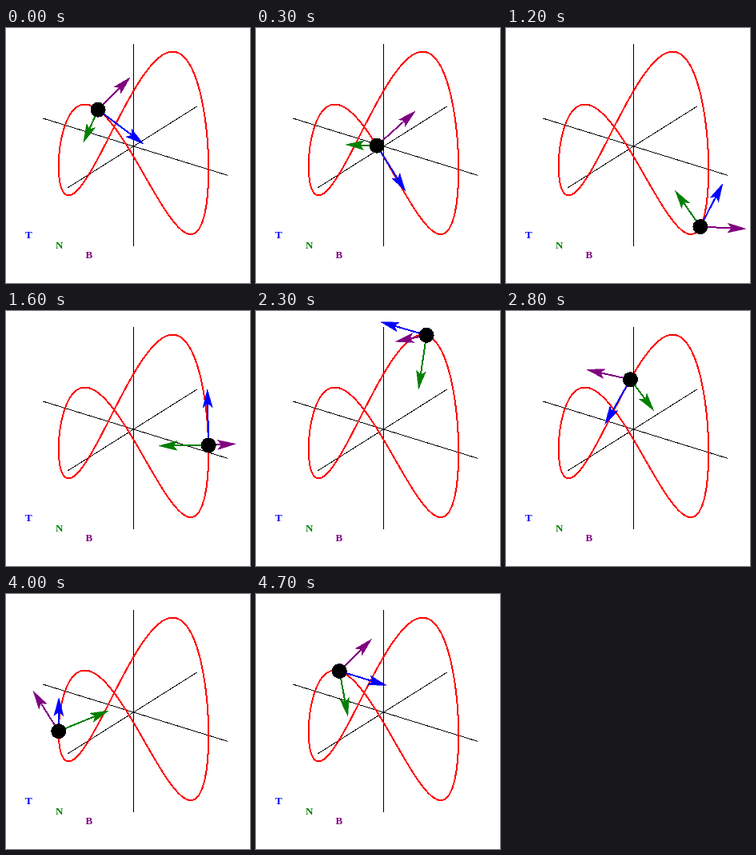
Recreate the animation shown at these times as an HTML page. Size 305 by 319 pixels, loop 4.8 s.

```html
<!DOCTYPE html>
<html lang="en">
<head>
<meta charset="utf-8">
<title>Moving frame on a space curve</title>
<style>
  html, body { margin: 0; width: 100%; height: 100%; overflow: hidden; background: #fff; }
  svg { display: block; width: 305px; height: 319px; }
  path, circle { shape-rendering: crispEdges; }
  text { font: bold 13px "Liberation Serif", "Times New Roman", serif; }
</style>
</head>
<body>
<svg viewBox="0 0 305 319">
  <path id="axes" stroke="#000" fill="none"/>
  <path id="curve" stroke="#f00" stroke-width="2" fill="none"/>
  <g id="arrows"></g>
  <circle id="ball" r="9.5"/>
  <text x="24" y="263" fill="#00f">T</text>
  <text x="62" y="275.5" fill="#008000">N</text>
  <text x="99.5" y="288" fill="#800080">B</text>
</svg>
<script>
const STEPS = 48, STEP_MS = 100, SCALE = 94, CAMERA = 52, ARROW = 0.75;
const CENTER = [159.5, 148];
const rad = Math.PI / 180;
const ca = Math.cos(35 * rad), sa = Math.sin(35 * rad);
const ce = Math.cos(26.2 * rad), se = Math.sin(26.2 * rad);
const el = id => document.getElementById(id);

const unit = v => v.map(c => c / Math.hypot(...v));
const cross = (a, b) => [
  a[1] * b[2] - a[2] * b[1],
  a[2] * b[0] - a[0] * b[2],
  a[0] * b[1] - a[1] * b[0]
];

// Mild perspective, seen from above the xy plane
function project([x, y, z]) {
  const side = sa * x - ca * y;
  const depth = side * ce + z * se;
  const k = SCALE * CAMERA / (CAMERA - depth);
  return [CENTER[0] + k * (ca * x + sa * y), CENTER[1] + k * (side * se - z * ce)];
}

const toPath = pts => "M" + pts.map(p => p.map(c => c.toFixed(2)).join()).join("L");

const point = s => [Math.sin(s), -Math.cos(s), Math.cos(2 * s)];

function frameAt(s) {
  const d1 = [Math.cos(s), Math.sin(s), -2 * Math.sin(2 * s)];
  const d2 = [-Math.sin(s), Math.cos(s), -4 * Math.cos(2 * s)];
  const t = unit(d1), b = unit(cross(d1, d2));
  return [t, cross(b, t), b];
}

function makeArrow(color) {
  const path = document.createElementNS("http://www.w3.org/2000/svg", "path");
  path.setAttribute("stroke", color);
  path.setAttribute("fill", color);
  el("arrows").append(path);
  const shaft = path.cloneNode();
  shaft.setAttribute("stroke-width", 2);
  path.setAttribute("stroke-width", 0.5);
  el("arrows").append(shaft);
  return { head: path, shaft };
}

function drawArrow(arrow, from, to) {
  const dx = to[0] - from[0], dy = to[1] - from[1];
  const len = Math.hypot(dx, dy) || 1;
  const ux = dx / len, uy = dy / len;
  const at = (back, side) => [to[0] - ux * back - uy * side, to[1] - uy * back + ux * side];
  const notch = at(18, 0);
  arrow.shaft.setAttribute("d", toPath([from, notch]));
  arrow.head.setAttribute("d", toPath([to, at(23, 6), notch, at(23, -6)]) + "Z");
}

const axes = [[1.5, 0, 0], [0, 1.5, 0], [0, 0, 1.5]];
el("axes").setAttribute("d",
  axes.map(a => toPath([project(a.map(c => -c)), project(a)])).join(""));
el("curve").setAttribute("d",
  toPath(Array.from({ length: 240 }, (_, i) => project(point(i * 1.5 * rad)))) + "Z");

const arrows = ["#00f", "#008000", "#800080"].map(makeArrow);

function draw(step) {
  const s = (step + 1) * 2 * Math.PI / STEPS;
  const p = point(s), pos = project(p);
  frameAt(s).forEach((v, i) =>
    drawArrow(arrows[i], pos, project(p.map((c, j) => c + ARROW * v[j]))));
  el("ball").setAttribute("cx", pos[0]);
  el("ball").setAttribute("cy", pos[1]);
}

const start = performance.now();
function tick() {
  draw(Math.floor((performance.now() - start) / STEP_MS) % STEPS);
  requestAnimationFrame(tick);
}
tick();
</script>
</body>
</html>
```
